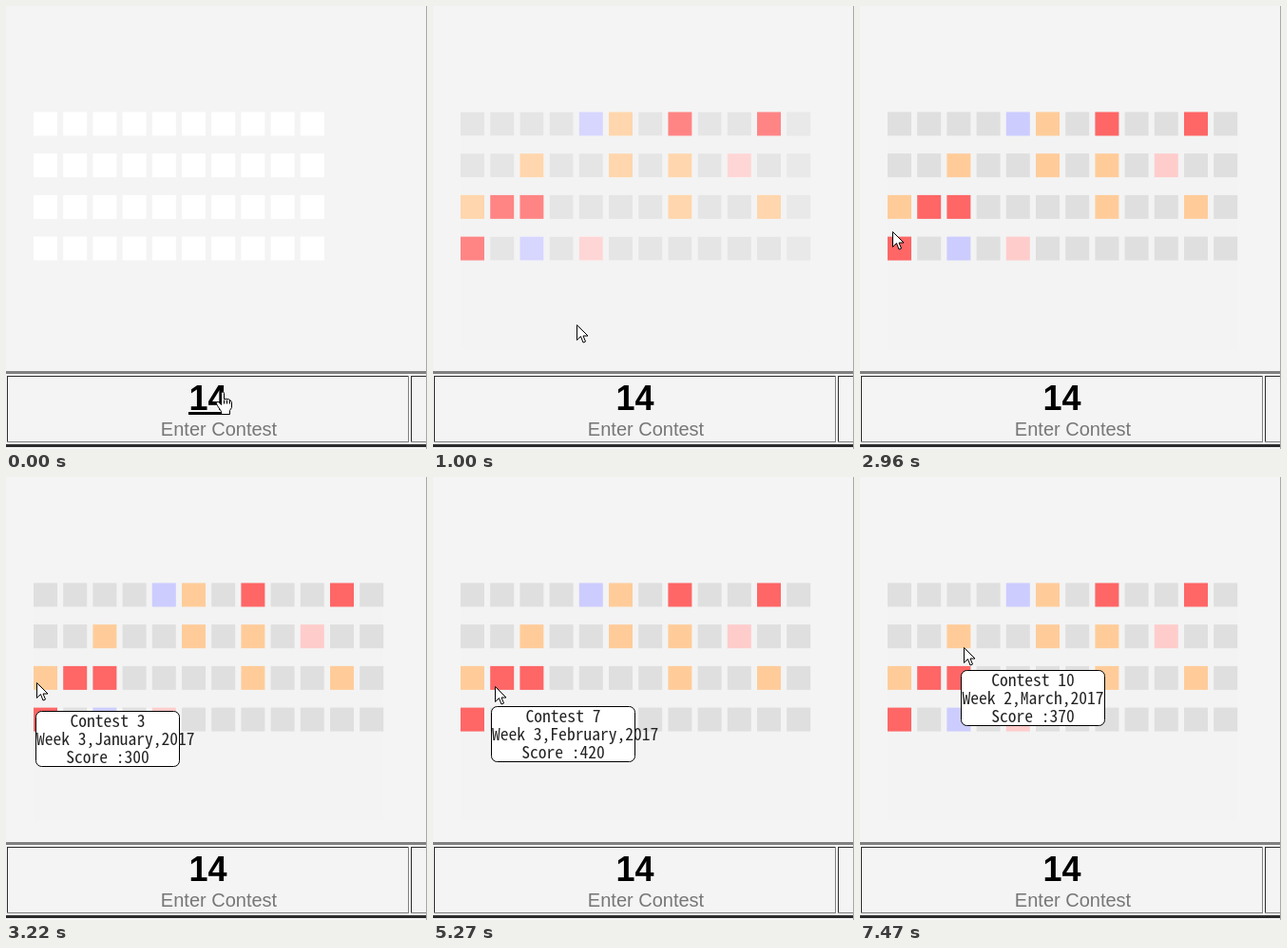
These frames come from a looping animation (443 by 466 pixels, 8000 ms). An HTML page with a canvas:

```html
<!DOCTYPE html>
<html lang="en">
<head>
<meta charset="utf-8">
<title>Contest calendar</title>
<style>
  html, body { margin: 0; width: 100%; height: 100%; overflow: hidden; background: #f4f4f4; }
  canvas { display: block; }
</style>
</head>
<body>
<canvas id="stage" width="443" height="466"></canvas>
<script>
const ctx = document.getElementById('stage').getContext('2d');
const LOOP = 8000;
const DARK = '#2c2c2c', GREY = '#808080';
const SANS = '"Liberation Sans", Arial, sans-serif';

// One row per week, one letter per month.
const WEEKS = ['....bo.r..r.', '..o..o.o.p..', 'orr....o..o.', 'r.b.p.......'];
const COLORS = { '.': '#dfdfdf', r: '#ff6666', o: '#ffcc99', b: '#ccccff', p: '#ffcccc' };
const MONTHS = ['January', 'February', 'March'];
const CELL = 25, HOT = 27;
const cellX = col => 29 + col * 31.2;
const cellY = row => 111.5 + row * 43.7;

const smooth = p => p * p * (3 - 2 * p);
const easeOut = p => p * (2 - p);

// Each visit moves the pointer in a few discrete steps to a cell with a tooltip.
const VISITS = [
  { start: 450, end: 1820, steps: 10, ease: smooth, from: [212, 378], to: [39, 256],
    col: 0, row: 3, score: 440, tip: [52, 288] },
  { start: 2960, end: 3220, steps: 2, ease: easeOut, from: [34, 237], to: [32, 216],
    col: 0, row: 2, score: 300, tip: [31, 246] },
  { start: 5020, end: 5270, steps: 2, ease: easeOut, from: [50, 217], to: [65, 220],
    col: 1, row: 2, score: 420, tip: [61, 241] },
  { start: 7070, end: 7470, steps: 3, ease: easeOut, from: [81, 206], to: [109, 179],
    col: 2, row: 1, score: 370, tip: [106, 203] }
];
const LEAVE = VISITS[0].start;
const FADE_START = 368, FADE_TIME = 1000, TICK = 137;

const ARROW = new Path2D('M0 0V16L4 12L6.5 18.5L9 17.5L6.5 11.5H11.5Z');
const HAND = new Path2D('M5 14V2Q6.5-2 8 2V8Q14 7 16 11V17L14 20V24H5V21L1 15Q-2 10 2 11Z' +
  'M8 9v4m3-4v4m3-4v4');

const TIP_FAMILY = '"Noto Sans Mono CJK SC", "Noto Sans Mono CJK JP", "Liberation Mono", monospace';
const CHAR_WIDTH = 8.77;
ctx.font = `300 100px ${TIP_FAMILY}`;
const tipFont = `300 ${CHAR_WIDTH / ctx.measureText('0').width * 100}px ${TIP_FAMILY}`;

function rect(x, y, w, h, color) {
  ctx.fillStyle = color;
  ctx.fillRect(x, y, w, h);
}

function text(str, x, y, font, color, align = 'center') {
  ctx.font = font;
  ctx.fillStyle = color;
  ctx.textAlign = align;
  ctx.fillText(str, x, y);
}

function fadeAt(time) {
  const t = LEAVE + Math.floor((time - LEAVE) / TICK) * TICK;
  const p = Math.min(1, Math.max(0, (t - FADE_START) / FADE_TIME));
  return p < 0.5 ? 4 * p ** 3 : 1 - 4 * (1 - p) ** 3;
}

function drawGrid(time) {
  const loaded = time >= 720;
  const fade = loaded ? fadeAt(time) : 0;
  if (time >= 870) rect(29, 112, 368, 250, '#f3f3f3');
  WEEKS.forEach((week, row) => {
    [...week].forEach((key, col) => {
      if (col > 9 && !loaded) return;
      const place = [cellX(col), cellY(row), CELL, CELL];
      // The last month appears straight from the page colour.
      const late = col === 11;
      if (!late && fade < 1) rect(...place, '#fff');
      ctx.globalAlpha = late ? fade ** 3 : fade;
      rect(...place, COLORS[key]);
      ctx.globalAlpha = 1;
    });
  });
}

function drawBox(x, w) {
  rect(x, 389, w, 1, DARK);
  rect(x, 389, 1, 70, DARK);
  rect(x, 458, w, 1, GREY);
  rect(x + w - 1, 389, 1, 70, GREY);
}

function drawFooter(hover) {
  rect(0, 384, 443, 3, GREY);
  rect(0, 461, 443, 3, DARK);
  drawBox(1, 423);
  drawBox(426, 40);
  rect(442, 0, 1, 466, '#a8a8a8');
  text('14', 212.5, 425, `bold 36px ${SANS}`, '#000');
  if (hover) rect(192, 427, 41, 3, '#000');
  text('Enter Contest', 224, 452, `20px ${SANS}`, '#777');
}

function drawTip({ col, row, score, tip: [x, y] }) {
  const lines = [
    `Contest ${col * WEEKS.length + row + 1}`,
    `Week ${row + 1},${MONTHS[col]},2017`,
    `Score :${score}`
  ];
  ctx.beginPath();
  ctx.roundRect(x + 0.5, y + 0.5, 151, 58, 6);
  ctx.fillStyle = '#fff';
  ctx.fill();
  ctx.strokeStyle = '#000';
  ctx.stroke();
  lines.forEach((line, i) => {
    const left = Math.max(1, 76 - line.length * CHAR_WIDTH / 2);
    text(line, x + left, y + 17 + i * 19, tipFont, '#222', 'left');
  });
}

function drawPointer(shape, [x, y]) {
  ctx.save();
  ctx.translate(x + 0.5, y + 0.5);
  ctx.fillStyle = '#fff';
  ctx.fill(shape);
  ctx.strokeStyle = '#000';
  ctx.stroke(shape);
  ctx.restore();
}

function pointerAt(time) {
  if (time < LEAVE) return time < 150 ? [221, 405] : [224, 404];
  const { start, end, steps, ease, from, to } = VISITS.findLast(v => time >= v.start);
  const step = Math.floor((time - start) / (end - start) * steps + 0.001);
  const p = ease(Math.min(1, step / steps));
  return from.map((a, i) => Math.round(a + (to[i] - a) * p));
}

function isOver({ col, row }, [x, y]) {
  const dx = x - cellX(col), dy = y - cellY(row);
  return dx >= 0 && dx < HOT && dy >= 0 && dy < HOT;
}

function draw(time) {
  const pointer = pointerAt(time);
  const hover = time < LEAVE;
  const visit = VISITS.find(v => isOver(v, pointer));
  rect(0, 0, 443, 466, '#f4f4f4');
  drawGrid(time);
  drawFooter(hover);
  if (visit) drawTip(visit);
  drawPointer(hover ? HAND : ARROW, pointer);
}

const begin = performance.now();
function tick() {
  draw((performance.now() - begin) % LOOP);
  requestAnimationFrame(tick);
}
tick();
</script>
</body>
</html>
```
